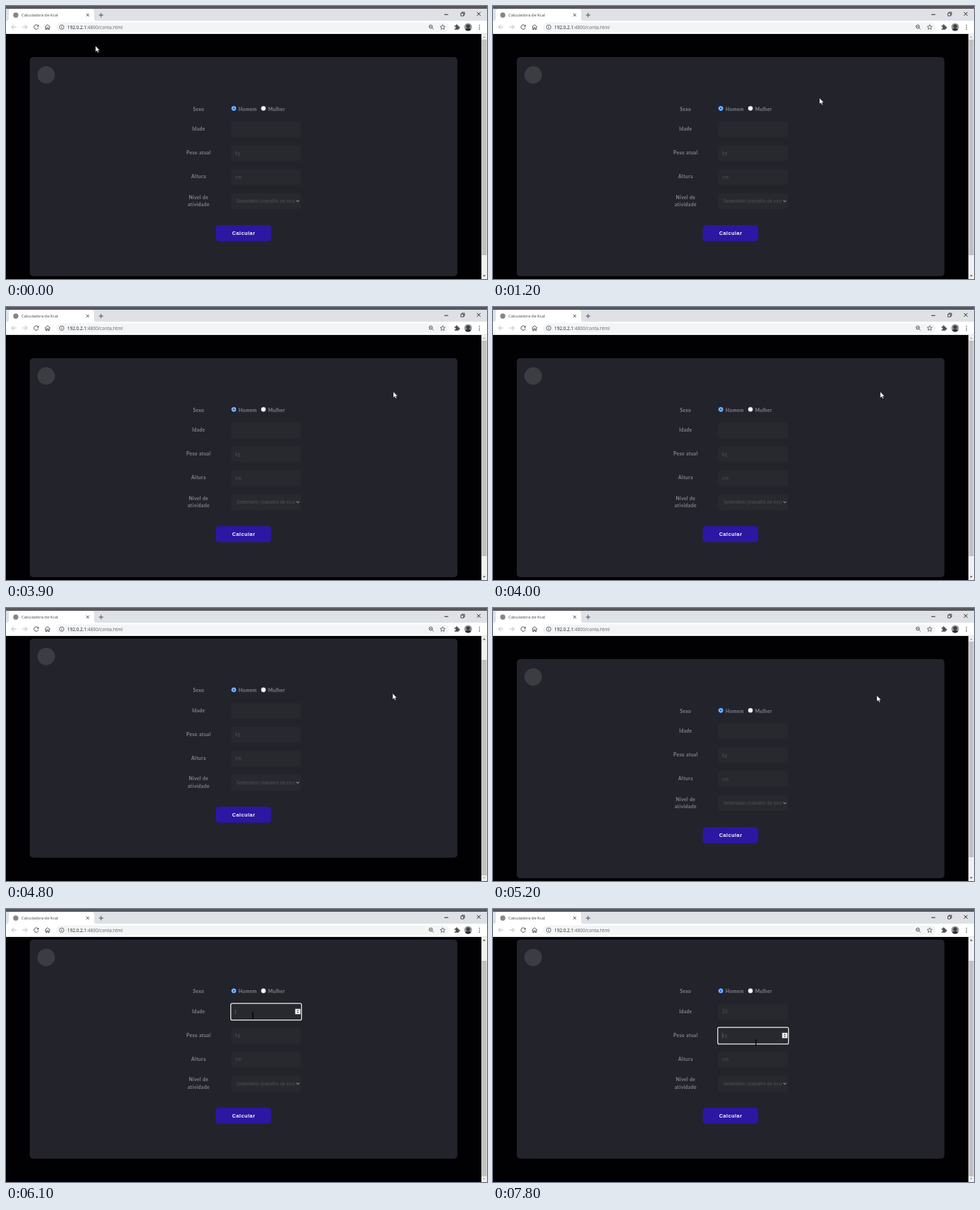
These frames come from a looping animation (688x390 px, 8000 ms). An HTML page:

```html
<!DOCTYPE html>
<html lang="pt">
<head>
<meta charset="utf-8">
<title>Calculadora de Kcal</title>
<style>
  html, body { margin: 0; width: 100%; height: 100%; overflow: hidden; background: #010103; }
  svg { display: block; width: 100vw; height: 100vh; }
  .ui { font-family: "Open Sans", sans-serif; fill: #3c4043; }
  .label { font: 700 6.8px Lato, sans-serif; letter-spacing: .4px; fill: #87878d; }
  .mid { text-anchor: middle; }
  .field { fill: #28282f; }
  .hint { font: 6.8px Lato, sans-serif; letter-spacing: .2px; fill: #505057; }
  .select { font: 6.7px "Liberation Sans", Arial, sans-serif; fill: #505057; }
  .button { font: 700 7.3px "Liberation Sans", Arial, sans-serif; letter-spacing: .55px; fill: #fff; }
  .icon { fill: none; stroke: #4d5156; stroke-width: 1; }
  .off { stroke: #b8babd; }
</style>
</head>
<body>
<svg viewBox="0 0 688 390" preserveAspectRatio="none">
  <defs>
    <clipPath id="selectClip"><rect x="322" y="267" width="91" height="23"/></clipPath>
    <clipPath id="avatarClip"><circle cx="661" cy="30" r="5.5"/></clipPath>
  </defs>
  <rect width="688" height="390" fill="#010103"/>

  <g id="page">
    <rect x="34" y="73" width="611.7" height="313" rx="5" fill="#23232b"/>
    <circle cx="57.5" cy="98.5" r="12.5" fill="#3c3c43"/>

    <g class="label mid">
      <text x="275.5" y="149.6">Sexo</text>
      <text x="275.5" y="178">Idade</text>
      <text x="275.5" y="212.2">Peso atual</text>
      <text x="275.5" y="246.4">Altura</text>
      <text x="275.5" y="275.7">Nível de</text>
      <text x="275.5" y="285.9">atividade</text>
    </g>
    <g class="label">
      <text x="332.8" y="149.6">Homem</text>
      <text x="375" y="149.6">Mulher</text>
    </g>
    <circle cx="325.9" cy="146.2" r="3.2" fill="#fff" stroke="#1673e6" stroke-width="1"/>
    <circle cx="325.9" cy="146.2" r="1.9" fill="#1673e6"/>
    <circle cx="368.2" cy="146.2" r="3.3" fill="#fff" stroke="#85858a" stroke-width=".5"/>

    <g class="field">
      <rect x="322" y="165" width="100" height="22.3" rx="3.5"/>
      <rect x="322" y="199.2" width="100" height="22.3" rx="3.5"/>
      <rect x="322" y="233.3" width="100" height="22.3" rx="3.5"/>
      <rect x="322" y="267.4" width="100" height="22.6" rx="3.5"/>
    </g>
    <g class="hint">
      <text id="age" x="327.8" y="178.4"></text>
      <text x="327.8" y="212.6">kg</text>
      <text x="327.8" y="246.8">cm</text>
    </g>
    <text class="select" x="329.6" y="281.2" clip-path="url(#selectClip)">Sedentário (trabalho de escritório)</text>
    <path d="M415.3 277.7l2 2 2-2" fill="none" stroke="#85858b" stroke-width="1.1"/>

    <rect x="300" y="313" width="79.3" height="23" rx="4.5" fill="#2b17a2"/>
    <text class="button mid" x="340" y="327.1">Calcular</text>

    <g id="focus">
      <rect x="321.5" y="164.2" width="101.2" height="23.8" rx="2" fill="none" stroke="#f2f2f2" stroke-width="1.2"/>
      <rect x="413.6" y="172" width="7.6" height="7.6" fill="#efefef"/>
      <path d="M415.9 175.1l1.5-1.8 1.5 1.8zM415.9 176.6l1.5 1.8 1.5-1.8z" fill="#444"/>
      <rect id="caret" x="327.8" y="172.2" width=".7" height="7.6" fill="#66666c"/>
    </g>
  </g>

  <rect x="680" y="40" width="8" height="350" fill="#f1f1f1"/>
  <rect id="thumb" x="680.6" y="48" width="6.8" height="308" fill="#c1c1c1"/>
  <path id="upArrow" d="M682 45.4l2-2.2 2 2.2z"/>
  <path id="downArrow" d="M682 384.6l2 2.2 2-2.2z"/>

  <g class="ui">
    <rect width="688" height="22" fill="#dee1e6"/>
    <rect width="688" height="4" fill="#58575c"/>
    <path d="M0 21.5q4 0 4-4V8q0-4 4-4h114q4 0 4 4v9.5q0 4 4 4z" fill="#fff"/>
    <rect y="21" width="688" height="19" fill="#fff"/>
    <rect y="39.4" width="688" height=".6" fill="#d5d7da"/>
    <circle cx="14" cy="13" r="3.7" fill="#85858a"/>
    <text x="22" y="15.1" font-size="5.75">Calculadora de Kcal</text>
    <rect x="71.5" y="23.5" width="562" height="13.6" rx="6.8" fill="#f3f4f5"/>
    <text x="87.7" y="32.6" font-size="6.53" fill="#202124">192.0.2.1<tspan fill="#5f6368">:4800/conta.html</tspan></text>

    <g class="icon">
      <path d="M114.8 10.8l4 4m0-4l-4 4M132.8 13h6.4m-3.2-3.2v6.4"/>
      <path class="off" d="M14.8 30H8m3.2-3.2L8 30l3.2 3.2M23.5 30h6.8m-3.2-3.2l3.2 3.2-3.2 3.2"/>
      <path d="M45.8 28.2a3.2 3.2 0 1 0 .5 2.6"/>
      <path d="M46.8 26.6v2.8H44z" fill="#4d5156" stroke="none"/>
      <path d="M55.6 30.2l3.8-3.6 3.8 3.6M56.8 29.6v4h1.7v-2.5h1.8v2.5H62v-4"/>
      <circle cx="79.7" cy="30.2" r="3.2" stroke-width=".8"/>
      <path d="M79.7 29.7v2.3m0-3.6v.8" stroke-width=".8"/>
      <circle cx="607.6" cy="29.5" r="2.4"/>
      <path d="M609.4 31.3l2.2 2.2M606.4 29.5h2.4" stroke-width=".9"/>
      <path d="M624.6 26.6l1 2.4 2.6.2-2 1.7.6 2.5-2.2-1.3-2.2 1.3.6-2.5-2-1.7 2.6-.2z" stroke-width=".8"/>
      <path d="M641.6 28h1.8a1.3 1.3 0 1 1 2.4 0h1.6v1.8a1.3 1.3 0 1 1 0 2.4v1.6h-5.8v-1.8a1.2 1.2 0 1 0 0-2.2z" fill="#4d5156" stroke="none"/>
      <path d="M627 12.2h5.6" stroke="#222"/>
      <path d="M650.7 10.2h3.9v3.9h-3.9zM652 10V8.9h3.9v3.9h-1.1" stroke="#222" stroke-width=".8"/>
      <path d="M673.7 8.8l5 5m0-5l-5 5" stroke="#222"/>
    </g>
    <g clip-path="url(#avatarClip)">
      <rect x="655" y="24" width="12" height="12" fill="#8f9a9f"/>
      <circle cx="661" cy="29" r="2.8" fill="#4b3a34"/>
      <ellipse cx="661" cy="35.5" rx="5" ry="3.8" fill="#2c3038"/>
    </g>
    <g fill="#4d5156">
      <circle cx="677.2" cy="27.5" r=".8"/><circle cx="677.2" cy="30.2" r=".8"/><circle cx="677.2" cy="32.9" r=".8"/>
    </g>
  </g>

  <path id="arrow" d="M0 0v8.6l2-1.8 1.4 3 1.4-.7-1.3-2.8h2.7z" fill="#fff" stroke="#000" stroke-width=".4"/>
  <path id="beam" d="M-1.5-4q1.5 0 1.5 .8V3.2q0 .8-1.5 .8M1.5-4Q0-4 0-3.2V3.2Q0 4 1.5 4" fill="none" stroke="#000" stroke-width=".9"/>
</svg>

<script>
const LOOP = 8000, TICK = 100, SCROLL_MAX = 29.3, THUMB_TRAVEL = 26;
const $ = id => document.getElementById(id);

// [time, x, y]
const pointerPath = [
  [500, 128, 57], [700, 120, 72], [1000, 330, 145], [1400, 604, 118],
  [1600, 590, 100], [1800, 612, 72], [2000, 633, 88], [2300, 633, 88],
  [2400, 672, 112], [2800, 434, 120], [3200, 546, 117], [3900, 554, 121],
  [4800, 553, 122], [5200, 549, 125], [5500, 530, 128], [5800, 353, 152],
  [7100, 353, 152], [7500, 372, 183], [7800, 376, 191]
];
// [time, share of the scroll range]
const scrollPath = [
  [3300, 0], [3400, .6], [3500, 1], [3700, 1], [3800, .35], [3900, 0],
  [4300, 0], [4400, .6], [4500, 1], [5000, 1], [5100, .4], [5200, 0],
  [5300, 0], [5400, .6], [5500, 1]
];

function sample(path, t) {
  const next = path.findIndex(key => key[0] > t);
  if (next < 0) return path[path.length - 1].slice(1);
  if (next === 0) return path[0].slice(1);
  const a = path[next - 1], b = path[next];
  const k = (t - a[0]) / (b[0] - a[0]);
  return a.slice(1).map((v, i) => v + (b[i + 1] - v) * k);
}

const set = (id, name, value) => $(id).setAttribute(name, value);
const show = (id, on) => set(id, "visibility", on ? "visible" : "hidden");

function draw(t) {
  const [scroll] = sample(scrollPath, t);
  const [x, y] = sample(pointerPath, t);
  const pageY = y + scroll * SCROLL_MAX;
  const overField = x > 322 && x < 422 && ((pageY > 165 && pageY < 187.5) || (pageY > 199 && pageY < 221.5));
  const inWeight = t >= 7500;
  const typed = t < 6700 ? "" : t < 6900 ? "2" : "26";

  set("page", "transform", `translate(0 ${-scroll * SCROLL_MAX})`);
  set("thumb", "y", 48 + scroll * THUMB_TRAVEL);
  set("upArrow", "fill", scroll > 0 ? "#505050" : "#a8a8a8");
  set("downArrow", "fill", scroll < 1 ? "#505050" : "#a8a8a8");

  $("age").textContent = typed;
  show("focus", t >= 5900);
  set("focus", "transform", `translate(0 ${inWeight ? 34.2 : 0})`);
  set("caret", "x", 327.8 + (inWeight ? 0 : typed.length * 4.1));

  for (const id of ["arrow", "beam"]) set(id, "transform", `translate(${x} ${y})`);
  show("arrow", !overField);
  show("beam", overField);
}

const start = performance.now();
function frame() {
  const t = (performance.now() - start) % LOOP;
  draw(Math.floor(t / TICK) * TICK);
  requestAnimationFrame(frame);
}
frame();
</script>
</body>
</html>
```
